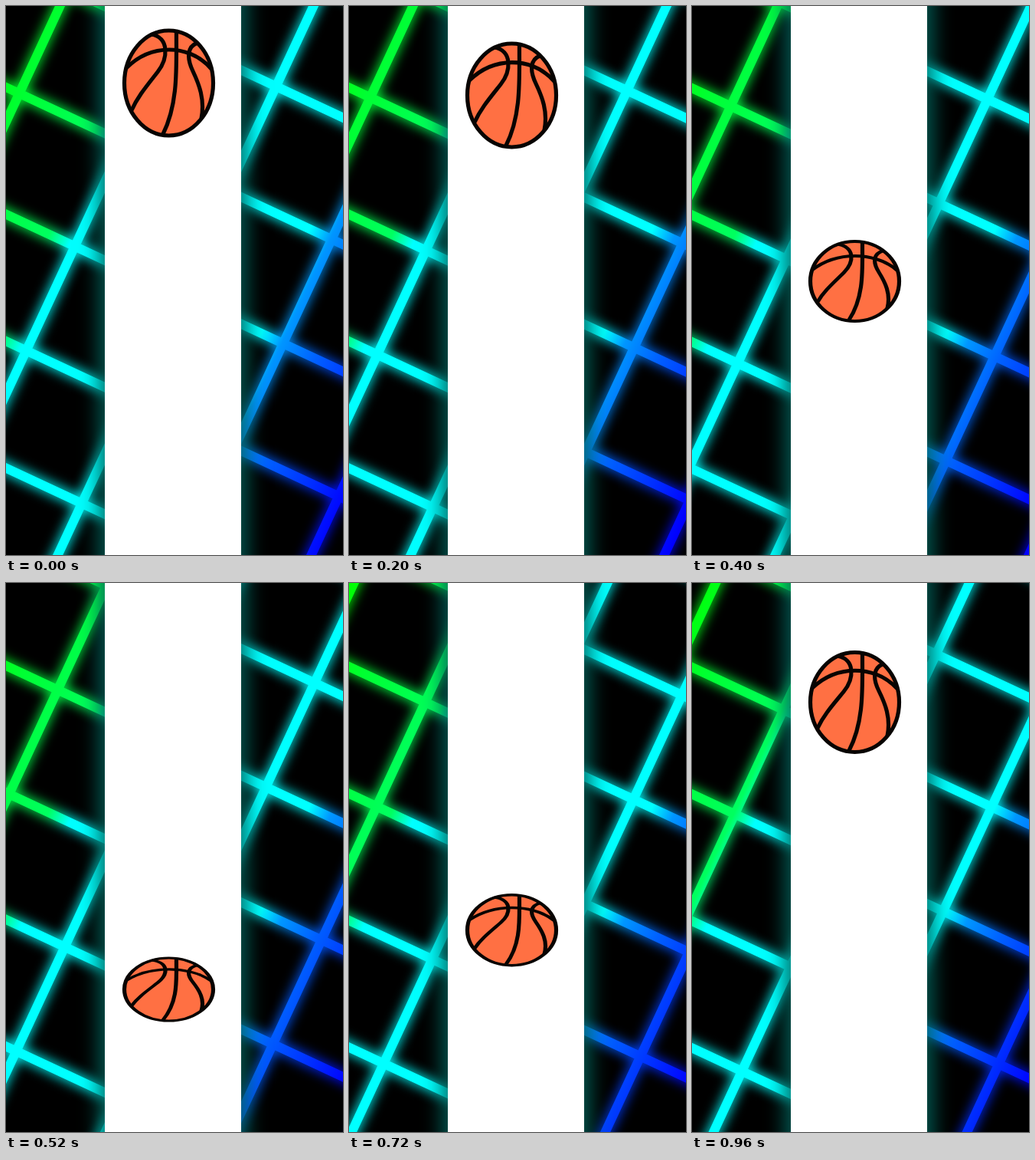
Animation, 440 px wide and 716 px high, one loop 1 s. Source, as an HTML page with a canvas:

```html
<!DOCTYPE html>
<html lang="en">
<head>
<meta charset="utf-8">
<title>Bouncing ball</title>
<style>
  html, body { margin: 0; width: 100%; height: 100%; overflow: hidden; background: #000; }
  #stage { position: relative; width: 440px; height: 716px; overflow: hidden; contain: paint; }
  canvas, svg { position: absolute; left: 0; top: 0; }
  #lane {
    position: absolute; left: 129px; top: -30px; width: 178px; height: 776px;
    background: #fff; box-shadow: 0 0 24px 8px rgba(0, 98, 90, .92);
  }
</style>
</head>
<body>
<div id="stage">
  <canvas id="grid" width="440" height="716"></canvas>
  <div id="lane"></div>
  <svg width="440" height="716" fill="none" stroke="#080402" stroke-width="5.2">
    <g id="ball">
      <ellipse rx="58" ry="68.5" fill="#ff7043"/>
      <g transform="translate(-212.5 -100.5)">
        <path d="M157 81C176 62 196 57 213 57S252 63 268 82"/>
        <path d="M222.500 32C222 75 226 125 205 167"/>
        <path d="M190 37C213 41 212 68 198 86S172 118 164 136"/>
        <path d="M250 48C236 53 236 68 244 85S260 122 255 147"/>
      </g>
    </g>
  </svg>
</div>
<script>
const LOOP = 1000, STEP = 40;
const W = 440, H = 716;
const TILT = 25 * Math.PI / 180, SLOPE = Math.tan(TILT);
const CELL = 150 / Math.cos(TILT);   // line spacing along either axis

// [time, value] keys
const SLIDE = [[0, 0], [200, 13], [400, 41], [520, 62], [600, 81], [800, 112], [960, 126], [1000, 130]];
const FALL = [[0, 100.5], [200, 116.5], [400, 359], [520, 530], [600, 681]];
const RISE = [[600, 681], [800, 323], [960, 155.5], [1000, 100.5]];

const ctx = document.getElementById('grid').getContext('2d');
const ball = document.getElementById('ball');

// Colour depends on x + SLOPE * y, so the gradient runs across the steep lines.
const SPAN = 780, end = SPAN * Math.cos(TILT) ** 2;
const paint = ctx.createLinearGradient(0, 0, end, end * SLOPE);
[[0, '#00ff00'], [75, '#00ff32'], [195, '#00ff5f'], [228, '#00ffff'], [532, '#00ffff'],
 [565, '#0096ff'], [620, '#005fff'], [690, '#002dff'], [750, '#0000ff']]
  .forEach(([s, color]) => paint.addColorStop(s / SPAN, color));

// Monotone cubic interpolation
function ease(keys, t) {
  const slope = i => (keys[i + 1][1] - keys[i][1]) / (keys[i + 1][0] - keys[i][0]);
  const last = keys.length - 1;
  const tangent = i => {
    if (i === 0) return slope(0);
    if (i === last) return slope(last - 1);
    const a = slope(i - 1), b = slope(i);
    return a * b > 0 ? 2 * a * b / (a + b) : 0;
  };
  let i = 0;
  while (i < last - 1 && t >= keys[i + 1][0]) i++;
  const [t0, v0] = keys[i], [t1, v1] = keys[i + 1];
  const d = t1 - t0, u = (t - t0) / d, r = 1 - u;
  return v0 * r * r * (1 + 2 * u) + v1 * u * u * (3 - 2 * u)
    + d * u * r * (r * tangent(i) - u * tangent(i + 1));
}

function drawGrid(shift) {
  const lines = new Path2D();
  for (let i = -3; i < 7; i++) {
    const x = 70.5 + shift + i * CELL, y = 106 + shift * 0.03 + i * CELL;
    lines.moveTo(x + 60 * SLOPE, -60);
    lines.lineTo(x - (H + 60) * SLOPE, H + 60);
    lines.moveTo(-60, y - 60 * SLOPE);
    lines.lineTo(W + 60, y + (W + 60) * SLOPE);
  }
  ctx.fillRect(0, 0, W, H);
  ctx.strokeStyle = paint;
  ctx.filter = 'blur(8px)';
  ctx.lineWidth = 14;
  ctx.stroke(lines);
  ctx.filter = 'none';
  ctx.lineWidth = 12;
  ctx.stroke(lines);
}

function frame(now) {
  const t = Math.floor(now % LOOP / STEP) * STEP;
  drawGrid(ease(SLIDE, t));
  const y = ease(t < 600 ? FALL : RISE, t);
  const squash = 1 - (y - 100.5) * 0.000933;
  ball.setAttribute('transform', `translate(212.5 ${y}) scale(1 ${squash})`);
}

const start = performance.now();
function tick() {
  frame(performance.now() - start);
  requestAnimationFrame(tick);
}
tick();
</script>
</body>
</html>
```
